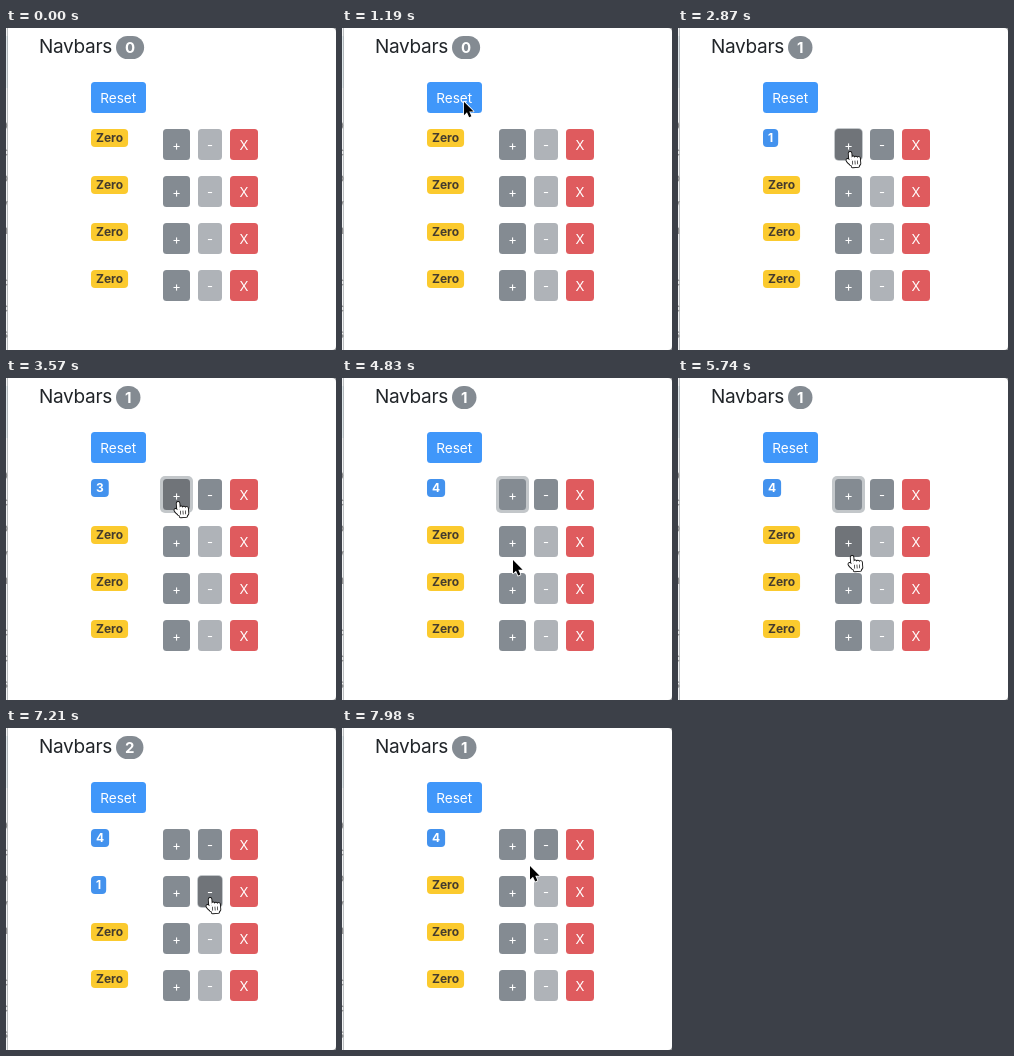
An HTML page with a canvas for the animation above (8000 ms loop, 330 by 322 pixels).

```html
<!DOCTYPE html>
<html lang="en">
<head>
<meta charset="utf-8">
<title>Navbars counter</title>
<style>
  html, body { margin: 0; width: 100%; height: 100%; overflow: hidden; background: #fff; }
  canvas { display: block; width: 330px; height: 322px; }
</style>
</head>
<body>
<canvas id="stage"></canvas>
<script>
const W = 330, H = 322, LOOP = 8000, STEP = 70;
const canvas = document.getElementById('stage');
const ctx = canvas.getContext('2d');
const dpr = window.devicePixelRatio || 1;
canvas.width = W * dpr;
canvas.height = H * dpr;

const FONT = 'Inter, "Open Sans", sans-serif';
const GRAY = '#848b92', GRAY_HOVER = '#707479', GRAY_OFF = '#afb3b8', RING = '#c3c7ca';
const BLUE = '#4097fa', BADGE_BLUE = '#4392ee', YELLOW = '#fbca2e';
const RED = '#df5b5e', RED_HOVER = '#cd4b50';

const ROW_COUNT = 4, ROW_TOP = 101, ROW_GAP = 47, BTN_H = 31;
const BUTTONS = [
  { label: '+', x: 157, w: 27 },
  { label: '-', x: 192, w: 24 },
  { label: 'X', x: 224, w: 28 }
];

// Evenly spaced click bursts; the window takes focus at ACTIVE_FROM
const BURSTS = [
  { row: 0, col: 0, start: 2870, every: 315, times: 4 },
  { row: 1, col: 0, start: 6370, every: 280, times: 2 },
  { row: 1, col: 1, start: 7210, every: 280, times: 2 }
];
const ACTIVE_FROM = 2520;

// Pointer moves: start, end, target x, target y
const ENTRY = { at: 70, x: 216, y: 318 };
const MOVES = [
  [70, 1050, 120, 73],
  [1120, 2030, 237, 113],
  [2030, 2380, 178, 118],
  [2450, 2870, 172, 124],
  [3880, 4340, 200, 160],
  [4480, 4830, 171, 182],
  [4970, 5530, 174, 178],
  [6720, 7070, 204, 170],
  [7560, 7980, 188, 138]
];

const clamp = u => Math.min(1, Math.max(0, u));
const ease = u => u * u * (3 - 2 * u);

function pointerAt(t) {
  if (t < ENTRY.at) return null;
  let { x, y } = ENTRY;
  for (const [start, end, tx, ty] of MOVES) {
    const k = ease(clamp((t - start) / (end - start)));
    x += (tx - x) * k;
    y += (ty - y) * k;
  }
  return { x, y };
}

function stateAt(t) {
  const counts = Array(ROW_COUNT).fill(0);
  let focus = null;
  for (const { row, col, start, every, times } of BURSTS) {
    if (t < start) break;
    const clicks = Math.min(times, Math.floor((t - start) / every) + 1);
    counts[row] += col === 0 ? clicks : -clicks;
    focus = { row, col, ring: 3 * clamp((t - start + STEP) / (3 * STEP)) };
  }
  if (focus && focus.col === 1 && !counts[focus.row]) focus = null;
  return { counts, focus };
}

function box(x, y, w, h, r, color) {
  ctx.fillStyle = color;
  ctx.beginPath();
  ctx.roundRect(x, y, w, h, r);
  ctx.fill();
}

function text(str, x, y, size, color, weight = 400, align = 'center') {
  ctx.font = `${weight} ${size}px ${FONT}`;
  ctx.textAlign = align;
  ctx.fillStyle = color;
  ctx.fillText(str, x, y);
}

function badge(str, x, y, h, r, size, pad, base, bg, fg) {
  ctx.font = `700 ${size}px ${FONT}`;
  const w = ctx.measureText(str).width + pad;
  box(x, y, w, h, r, bg);
  text(str, x + w / 2, base, size, fg, 700);
}

function corner(y, dir) {
  ctx.beginPath();
  ctx.moveTo(W - 4, y);
  ctx.quadraticCurveTo(W, y, W, y + 4 * dir);
  ctx.lineTo(W, y);
  ctx.fill();
}

function drawPage() {
  ctx.fillStyle = '#fff';
  ctx.fillRect(0, 0, W, H);

  // Sliver of the page behind the popup
  ctx.save();
  ctx.beginPath();
  ctx.rect(0, 0, 2, H);
  ctx.clip();
  ctx.fillStyle = '#f2f3f4';
  ctx.fillRect(0, 0, 2, H);
  ctx.fillStyle = '#dfe7ea';
  ctx.fillRect(0, 8, 2, 52);
  [...'Dcpvh ccs'].forEach((c, i) => text(c, 2, 102 + i * 26, 12, '#888', 400, 'right'));
  ctx.fillStyle = 'rgba(110,115,120,.4)';
  ctx.fillRect(1, 0, 1, H);
  ctx.restore();

  ctx.fillStyle = '#8d8f91';
  corner(0, 1);
  corner(H, -1);
}

function isOver(p, btn, top) {
  return p.x >= btn.x && p.x <= btn.x + btn.w && p.y - 1 >= top && p.y - 1 < top + BTN_H;
}

function drawRow(row, { counts, focus }, pointer, active) {
  const top = ROW_TOP + row * ROW_GAP, n = counts[row];
  let hot = false;
  badge(n ? String(n) : 'Zero', 85, top, 18, 4, 12, 10, top + 13.4,
        n ? BADGE_BLUE : YELLOW, n ? '#fff' : '#453c2e');

  BUTTONS.forEach((btn, col) => {
    const disabled = col === 1 && !n;
    const over = active && !disabled && isOver(pointer, btn, top);
    if (focus && focus.row === row && focus.col === col) {
      const s = focus.ring;
      box(btn.x - s, top - s, btn.w + 2 * s, BTN_H + 2 * s, 5, RING);
    }
    let color = over ? GRAY_HOVER : GRAY;
    if (col === 2) color = over ? RED_HOVER : RED;
    if (disabled) color = GRAY_OFF;
    box(btn.x, top, btn.w, BTN_H, 3.5, color);
    text(btn.label, btn.x + btn.w / 2, top + 21, 13.1, '#fff');
    hot = hot || over;
  });
  return hot;
}

// Strokes first, so the fill leaves only the outer outline
function outlined(path, fill, stroke, width) {
  ctx.lineJoin = 'round';
  ctx.lineWidth = width;
  ctx.strokeStyle = stroke;
  ctx.stroke(path);
  ctx.fillStyle = fill;
  ctx.fill(path);
}

const ARROW = new Path2D('M0 0V13.5L3 10.7 5.2 15.6 7.4 14.6 5.3 9.8H9.6Z');

const HAND = new Path2D();
for (let i = 0; i < 4; i++) {
  HAND.roundRect(-1.4 + 2.7 * i, i ? 4.2 + 0.5 * i : 0, 2.7, 8, 1.3);
}
HAND.roundRect(-1.4, 7.5, 10.8, 6, 2);
HAND.roundRect(0.6, 9, 7.4, 6.5, 1);
HAND.ellipse(-1.6, 9.6, 1.5, 3.4, -0.7, 0, Math.PI * 2);

function drawPointer({ x, y }, hot) {
  ctx.save();
  ctx.translate(x, y);
  if (!hot) {
    outlined(ARROW, '#000', '#fff', 1.6);
  } else {
    ctx.rotate(-0.08);
    outlined(HAND, '#fff', '#111', 1.8);
    ctx.fillStyle = '#333';
    for (let i = 1; i < 4; i++) ctx.fillRect(-1.2 + 2.5 * i, 9, 0.8, 3.8);
  }
  ctx.restore();
}

function draw(time) {
  const t = Math.floor((time % LOOP) / STEP) * STEP;
  const state = stateAt(t), pointer = pointerAt(t), active = t >= ACTIVE_FROM;
  ctx.setTransform(dpr, 0, 0, dpr, 0, 0);
  drawPage();

  ctx.letterSpacing = '-0.3px';
  text('Navbars', 33, 25, 19, '#212529', 400, 'left');
  ctx.letterSpacing = '0px';
  const used = state.counts.filter(Boolean).length;
  badge(String(used), 110, 8, 23, 11.5, 15, 18, 25, GRAY, '#fff');

  box(85, 54, 55, 31, 3.5, BLUE);
  text('Reset', 112.2, 75, 13.6, '#fff');

  let hot = false;
  for (let row = 0; row < ROW_COUNT; row++) {
    hot = drawRow(row, state, pointer, active) || hot;
  }
  if (pointer) drawPointer(pointer, hot);
}

const start = performance.now();
function tick() {
  draw(performance.now() - start);
  requestAnimationFrame(tick);
}
tick();
</script>
</body>
</html>
```
